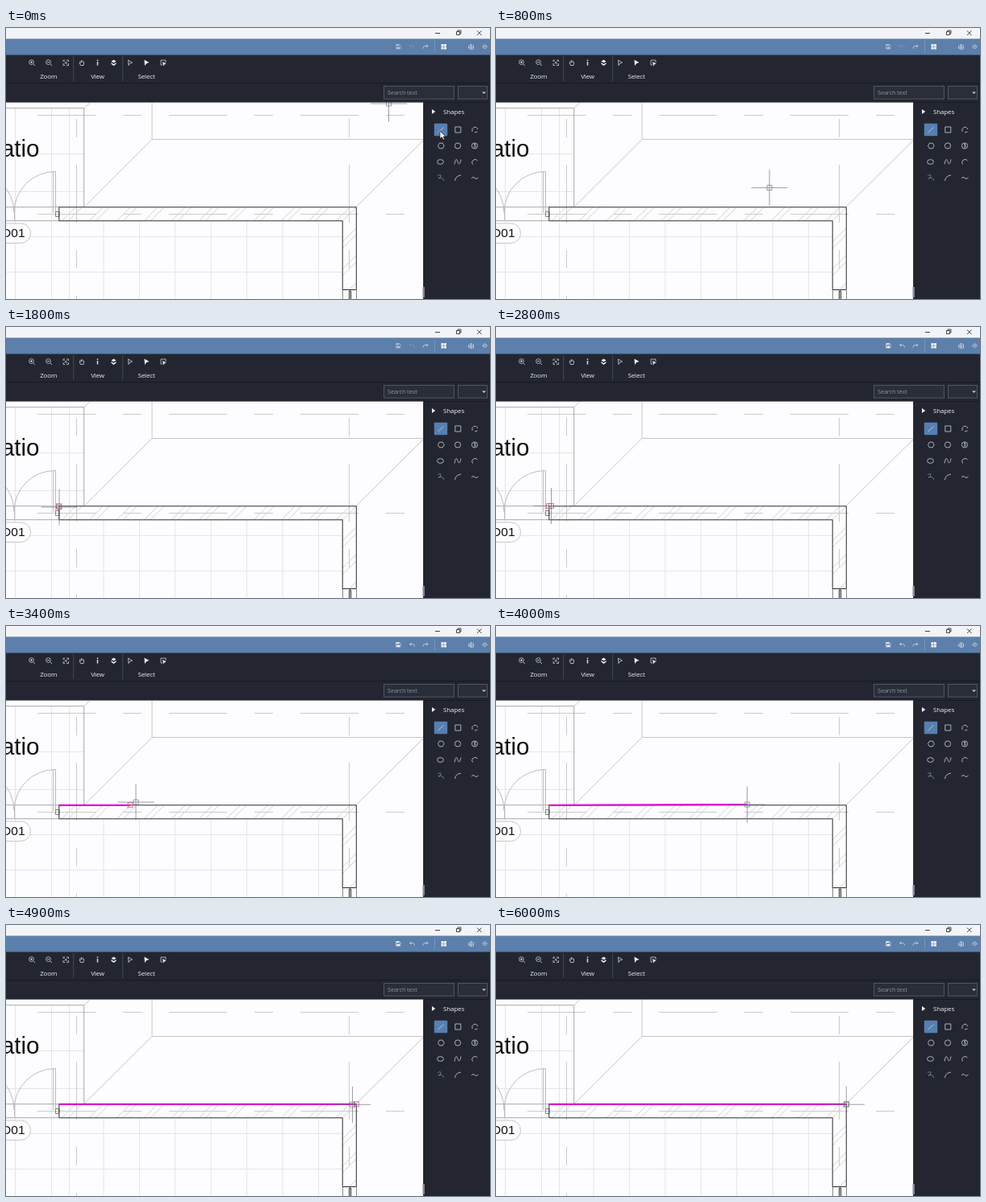
Recreate the animation shown at these times as an HTML page. Size 600 by 337 pixels, loop 6.1 s.

```html
<!DOCTYPE html>
<html lang="en">
<head>
<meta charset="utf-8">
<title>Drawing a line along a wall</title>
<style>
  html, body { margin: 0; width: 100%; height: 100%; overflow: hidden; background: #fff; }
  svg { display: block; width: 100%; height: 100%; }
  .ui { font-family: "Open Sans", "Noto Sans", sans-serif; font-size: 8px; letter-spacing: -.15px; fill: #eceef2; }
  .plan { font-family: "Liberation Sans", Arial, sans-serif; fill: #111; }
  .line { fill: none; stroke-width: 1; }
  .icon { fill: none; stroke: #d9dce2; stroke-width: .75; }
  .solid { fill: #f0f1f4; stroke: none; }
  .axis { stroke: #cbcbcd; stroke-dasharray: 72 34 23 34; }
</style>
</head>
<body>
<svg viewBox="0 0 600 337" preserveAspectRatio="none">
  <defs>
    <clipPath id="wall"><path d="M66 223H434V325H417V240H66Z"/></clipPath>
  </defs>

  <!-- floor plan -->
  <rect width="600" height="337" fill="#fdfcfe"/>
  <g class="line">
    <path id="tiles" stroke="#e5e5e7"/>
    <path class="axis" d="M39 108.5H517M39 231.5H517"/>
    <path class="axis" stroke-dashoffset="106" d="M87.5 113V337M425.5 113V337"/>
    <path stroke="#c6c6c8" d="M181 93V138.5H517M97 222.5L181 138.5M434 222.5L517 140M97 99.5L104 93"/>
    <path stroke="#a8a8aa" d="M0 99.7H96.7V222.5M0 222.7H66M0 239.7H66"/>
    <path stroke="#bcbcbe" d="M58.5 230V178.5H61.5V230M61 178.5A51 51 0 0 0 10 229.5A51 51 0 0 0 -41 178.5M10.5 222V240"/>
    <path stroke="#858587" d="M61.5 228.5H66V234.5H61.5Z"/>
    <path id="hatch" stroke="#d3d3d5" clip-path="url(#wall)"/>
    <path stroke="#2c2c2e" d="M65.8 222.8H434.3V325.5H417.2V239.8H65.8Z"/>
    <path stroke="#888" d="M417.5 326V337M434.5 326V337"/>
    <path stroke="#222" d="M425.5 337V327H427.5V337"/>
    <rect x="-30" y="243" width="60.5" height="24.5" rx="12" fill="#fdfcfe" stroke="#c6c6c8"/>
  </g>
  <g class="plan" text-anchor="end">
    <text x="41.5" y="159.8" font-size="29.5">Patio</text>
    <text x="23.5" y="260.3" font-size="15.5">D01</text>
  </g>

  <!-- drawing tool -->
  <path id="stroke" fill="none" stroke="#dd0fd0" stroke-width="2.2"/>
  <rect id="snap" x="-3" y="-3" width="6" height="6" fill="none" stroke="#d8639c" stroke-width=".9"/>
  <path id="cross" fill="none" stroke="#6f7080" stroke-opacity=".85" stroke-width=".8" d="M-22.5 0H22.5M0 -22.5V22.5M-3 -3H3V3H-3Z"/>

  <!-- window frame -->
  <rect width="600" height="14" fill="#f2f4f7"/>
  <path class="line" stroke="#444" stroke-width=".8" d="M532 6.5H538M558.5 4.5H562.5V8.5H558.5ZM560 4.5V3H564V7H562.5M584 3.5L589.5 9M589.5 3.5L584 9"/>
  <rect y="33" width="600" height="59.6" fill="#232630"/>
  <rect y="13.4" width="600" height="20.1" fill="#5c7fab"/>
  <rect x="517.3" y="92" width="83" height="245" fill="#232630"/>
  <path class="line" stroke="#181a21" d="M0 68.7H600M518 92.5H600M518 93V337"/>
  <path class="line" stroke="#444852" d="M83.7 35V66M144.7 35V66"/>
  <path stroke="#7c95b8" d="M531.5 16V30"/>
  <rect x="516.5" y="322" width="2.5" height="13" fill="#858892"/>

  <g class="icon">
    <g id="save"><path d="M483.5 20.5H488L489 21.5V26H483.5Z"/><path class="solid" d="M484.5 23.5H488V26H484.5ZM484 20.5H487.5V22H484Z"/></g>
    <path id="undo" d="M502.5 20.5L500.5 22.5L502.5 24.5M500.5 22.5H504.5Q506.5 22.5 506.5 25.5"/>
    <path d="M521 20.5L523 22.5L521 24.5M523 22.5H519Q517 22.5 517 25.5"/>
    <path class="solid" d="M539.5 20H542.5V23H539.5ZM543 20H546V23H543ZM539.5 23.5H542.5V26.5H539.5ZM543 23.5H546V26.5H543Z"/>
    <path d="M573.5 22.5L576.5 20.5L579.5 22V26L576.5 26.5L573.5 25ZM576.5 20.5V26.5M573.5 24H579.5"/>
    <path d="M590.5 23L593.5 20.5L596.5 23L593.5 26ZM592 23H595"/>
  </g>

  <!-- ribbon -->
  <g class="icon">
    <path d="M34 45L36 47M30 42.5H33M31.5 41V44M55 45L57 47M51 42.5H54"/>
    <circle cx="31.500" cy="42.500" r="2.900"/><circle cx="52.500" cy="42.500" r="2.900"/>
    <path d="M71 42V40H73M75 40H77.5V42M77.5 44V46.5H75M73 46.5H71V44M72.5 41.5L76 45M76 41.5L72.5 45"/>
    <path d="M92 44V41M93.5 43V40M95 43V40.5M96.5 44V42M91 43L92.5 46.5H96L96.5 44"/>
    <path stroke-width="1.5" d="M113.5 39.5V41M113.5 42V46.5"/>
    <path class="solid" d="M130.5 41.5L133.5 39.5L136.5 41.5L133.5 43.2ZM130.5 43L133.5 45L136.5 43V44.8L133.5 47L130.5 44.8Z"/>
    <path d="M151.5 40L156.5 43L153.5 44L152 46.5Z"/>
    <path class="solid" d="M171.5 39.5L177.5 43L174.3 44L172 47Z"/>
    <path d="M192 40H198V43M192 40V46H194.5"/>
    <path class="solid" d="M194 42L199 44.5L196.5 45L195.5 47.5Z"/>
  </g>
  <g class="ui" text-anchor="middle">
    <text x="52.7" y="63.3">Zoom</text>
    <text x="113.5" y="63.3">View</text>
    <text x="174" y="63.3">Select</text>
  </g>
  <g fill="#2a2e39" stroke="#555a66" stroke-width=".9">
    <rect x="468.5" y="72.5" width="87" height="15.7"/>
    <rect x="560.5" y="72.5" width="36" height="15.7"/>
  </g>
  <text class="ui" x="473" y="82.8" style="font-size:7.4px;fill:#8c909b">Search text</text>
  <path class="solid" d="M590 79.5H595L592.5 82Z" fill-opacity=".8"/>

  <!-- shapes panel -->
  <path class="solid" d="M528 101L532.3 104L528 107Z"/>
  <text class="ui" x="542" y="106.7">Shapes</text>
  <rect x="530.8" y="118.8" width="16.4" height="15.4" rx="1" fill="#567fb2"/>
  <g class="icon">
    <path d="M535.5 130L542.5 123.5M556.8 123H563.8V130H556.8Z"/>
    <path d="M578 129Q577 125 580 123.5Q584 122.5 584.5 126M584.5 129L581 130"/>
    <path d="M535.5 146.5L537.3 143.2H541.3L543.2 146.5L541.3 149.8H537.3Z"/>
    <circle cx="560" cy="146.5" r="3.6"/>
    <circle cx="581" cy="146.5" r="3.6"/><path d="M580 144.5H582L580.5 147H582.5L580 149.5"/>
    <ellipse cx="538.5" cy="166.5" rx="3.9" ry="2.9"/>
    <path d="M556 169.5C557.5 161 559 163 560 166.500S563 170 564 163.500"/>
    <path d="M578.500 169.500A3.700 3.700 0 1 1 584.500 165"/>
    <path stroke="#8d929c" d="M535 184Q539 181 539 184T536 187Q541 185 543 190"/>
    <path d="M556.5 190Q557 184 564 183M577 187Q579 184 581 186.5T585.5 186"/>
  </g>
  <path id="arrow" fill="#fff" stroke="#222" stroke-width=".7" d="M0 0V9.5L2.3 7.5L4 11L5.6 10.2L4 7H7Z"/>
</svg>
<script>
const LOOP = 6100, STEP = 100, CLICK = 2300;
const START = [65.5, 222.8];
const SNAPS = [START, [65.5, 230], [154, 222.8], [434.3, 222.8]];
const SNAP_RADIUS = 9;

// pointer path: time, x, y
const PATH = [
  [300, 538, 128], [400, 526, 132], [500, 494, 143], [700, 395, 180], [1000, 227, 236],
  [1200, 112, 237], [1300, 82, 232], [1400, 71, 229], [1700, 66, 225], [1800, 66, 224],
  [2600, 66, 224], [2800, 68.5, 222.5], [3000, 84, 221], [3400, 161, 219], [3600, 208, 218],
  [4000, 311.3, 222], [4400, 376, 222], [4700, 418, 223], [4900, 429.5, 223.3],
  [5100, 433, 223], [5300, 434.3, 223.2]
];

const $ = id => document.getElementById(id);
const place = (id, [x, y]) => $(id).setAttribute("transform", `translate(${x} ${y})`);
const show = (id, on) => $(id).setAttribute("visibility", on ? "visible" : "hidden");

function pointerAt(t) {
  const i = PATH.findIndex(key => key[0] >= t);
  if (i < 1) return (i ? PATH.at(-1) : PATH[0]).slice(1);
  const [t0, x0, y0] = PATH[i - 1], [t1, x1, y1] = PATH[i];
  const k = (t - t0) / (t1 - t0);
  return [x0 + (x1 - x0) * k, y0 + (y1 - y0) * k];
}

function nearestSnap([x, y]) {
  const distance = p => Math.hypot(p[0] - x, p[1] - y);
  const best = SNAPS.reduce((a, b) => distance(b) < distance(a) ? b : a);
  return distance(best) < SNAP_RADIUS ? best : null;
}

function buildPlan() {
  let tiles = "M0 156.5H96M0 203.5H96M0 259.5H417M0 303.5H417M11.5 100V337M56.5 100V337M78.5 100V337";
  for (let x = 121; x < 417; x += 44.4) tiles += `M${x} 240V337`;
  $("tiles").setAttribute("d", tiles);
  let hatch = "";
  for (let x = -16; x < 560; x += 34)
    for (const gap of [0, 8]) hatch += `M${x + gap} 223l-110 110`;
  $("hatch").setAttribute("d", hatch);
}

function draw(now) {
  const t = Math.floor(now % LOOP / STEP) * STEP;
  const pointer = pointerAt(t), inPanel = pointer[0] > 517;
  const snap = inPanel ? null : nearestSnap(pointer);
  const end = snap || pointer;

  place("arrow", pointer);
  show("arrow", inPanel);
  place("cross", inPanel ? [474.5, 94] : pointer);
  if (snap) place("snap", snap);
  show("snap", snap);
  show("stroke", t >= CLICK);
  $("stroke").setAttribute("d", `M${START}L${end}`);
  $("save").setAttribute("opacity", t < CLICK ? .6 : 1);
  $("undo").setAttribute("opacity", t < CLICK ? .25 : 1);
  requestAnimationFrame(draw);
}

buildPlan();
requestAnimationFrame(draw);
</script>
</body>
</html>
```
